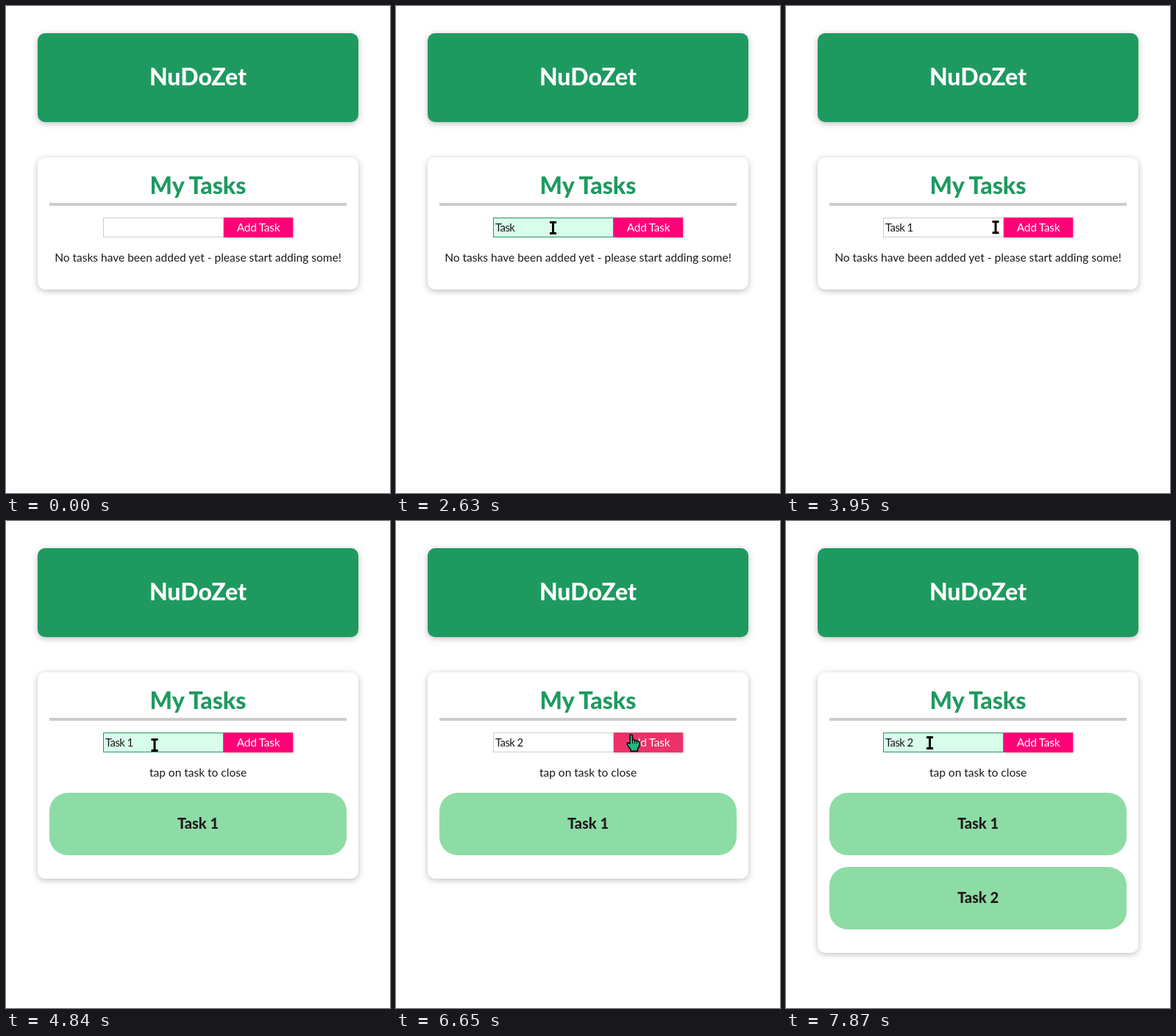
Write an HTML page that moves like this. It is 522x663 px and loops after 8 s.

```html
<!DOCTYPE html>
<html lang="en">
<head>
<meta charset="utf-8">
<title>Task list</title>
<style>
  html, body { margin: 0; width: 100%; height: 100%; overflow: hidden; background: #fff; }
  svg { display: block; width: 522px; height: 663px; font: 15.5px Lato, sans-serif; }
  text { white-space: pre; fill: #1a1a1a; }
  .mid { text-anchor: middle; }
  .panel { filter: drop-shadow(0 2px 4px rgba(0, 0, 0, .26)); }
  .title { font-size: 32px; font-weight: 800; }
  .field { font-size: 15px; letter-spacing: -.6px; }
  .label { letter-spacing: -.3px; fill: #fff; }
  .item rect { fill: #8ddca5; }
  .item text { font-size: 20px; font-weight: 800; fill: #20191d; }
  #button { fill: #ff0077; filter: drop-shadow(1px 1px 1.5px rgba(0, 0, 0, .26)); }
  #button.hover { fill: #ec3169; }
</style>
</head>
<body>
<svg viewBox="0 0 522 663">
  <rect class="panel" x="43" y="37" width="436" height="121" rx="10" fill="#1e9a60"/>
  <text class="title mid" x="261" y="108" style="fill:#fff">NuDoZet</text>

  <rect id="card" class="panel" x="43" y="206" width="436" height="180" rx="10" fill="#fff"/>
  <text class="title mid" x="261" y="256" style="fill:#1e9a60">My Tasks</text>
  <rect x="59" y="268" width="404" height="4" fill="#ccc"/>

  <rect id="button" x="296" y="288" width="94" height="27"/>
  <text class="label mid" x="343" y="307">Add Task</text>
  <rect id="input" x="132.5" y="288.5" width="163" height="26"/>
  <text id="value" class="field" x="135" y="307"></text>
  <rect id="caret" y="290" width="1" height="23"/>

  <text id="hint" class="mid" x="261" y="348"></text>
  <g class="item">
    <rect x="59" y="370" width="404" height="85" rx="25"/>
    <text class="mid" x="261" y="419">Task 1</text>
  </g>
  <g class="item" transform="translate(0 101)">
    <rect x="59" y="370" width="404" height="85" rx="25"/>
    <text class="mid" x="261" y="419">Task 2</text>
  </g>

  <g id="pointer">
    <circle id="press" r="12" fill="#f8a42c" fill-opacity=".85"/>
    <path id="arrow" d="M.5 .5V16L4 12.6L6.6 18.5L9 17.4L6.5 11.8H11.5Z" fill="#1fbf86" stroke="#000"/>
    <path id="beam" d="M-4.5 -9H4.5V-6H1.5V6H4.5V9H-4.5V6H-1.5V-6H-4.5Z"/>
    <g id="hand">
      <path d="M-1.5 13V2Q-1.5 .7 0 .7T2 2V8Q4 6.5 5 9Q7 7.5 8 10Q11 9 11.5 12V16L9 20V23.3H-.5V21L-5 15Q-6 12.5 -4 11.5Z"
        fill="#1fb985" stroke="#000" stroke-width="1.5" stroke-linejoin="round"/>
      <path d="M2 8V13M5 9V13M8 10V13" stroke="#000"/>
      <path id="grip" d="M-4 16H12V17L9 20V24H-1V21Z"/>
    </g>
  </g>
</svg>
<script>
const LOOP = 8000;
const STEP = 100;        // time between pointer positions, keys, press and release
const BLINK = 490;
const ADD_DELAY = 210;
const el = Object.fromEntries([...document.querySelectorAll('[id]')].map(n => [n.id, n]));
const items = document.querySelectorAll('.item');

// Where the pointer goes, how long it travels and when it clicks there.
const stops = [
  { x: 230, y: 433, arrive: 190, travel: 0 },
  { x: 213.5, y: 302, arrive: 490, travel: 200, click: 710 },
  { x: 314, y: 300, arrive: 3550, travel: 220, click: 3760 },
  { x: 202, y: 305, arrive: 4150, travel: 200, click: 4250 },
  { x: 407, y: 296, arrive: 6150, travel: 200 },
  { x: 319.5, y: 290, arrive: 6350, travel: 100, click: 6550 },
  { x: 195.5, y: 302, arrive: 7070, travel: 200, click: 7270 }
];
// '<' erases one character.
const bursts = [
  { at: 1520, keys: 'T' }, { at: 1930, keys: 'ask' }, { at: 2730, keys: ' ' },
  { at: 2930, keys: '1' }, { at: 5350, keys: '<2' }
];

const overButton = p => p.y >= 288 && p.y < 315 && p.x >= 296 && p.x < 390;
const overInput = p => p.y >= 288 && p.y < 315 && p.x >= 132 && p.x < 296;
const clicks = stops.filter(s => s.click);
const show = (node, on) => node.setAttribute('display', on ? 'inline' : 'none');
const ease = k => k * k * (3 - 2 * k);

function typedAt(t) {
  let text = '', last = 0;
  for (const { at, keys } of bursts) {
    [...keys].forEach((key, i) => {
      const time = at + i * STEP;
      if (t < time) return;
      text = key === '<' ? text.slice(0, -1) : text + key;
      last = time;
    });
  }
  return { text, last };
}

// The input gains focus on release and loses it as the button goes down.
function focusTime(t) {
  const starts = clicks.map(s => overInput(s) ? { on: true, time: s.click + STEP } : { on: false, time: s.click });
  const latest = starts.filter(s => t >= s.time).pop();
  return latest && latest.on ? latest.time : null;
}

function pointerAt(t) {
  const i = stops.findLastIndex(s => t >= s.arrive - s.travel);
  if (i < 1) return stops[i];
  const to = stops[i], from = stops[i - 1];
  const count = Math.round(to.travel / STEP) + 1;
  const done = Math.floor((t - to.arrive + to.travel) / STEP) + 1;
  const k = ease(Math.min(1, done / count));
  return { x: from.x + (to.x - from.x) * k, y: from.y + (to.y - from.y) * k };
}

function drawField(t) {
  const { text, last } = typedAt(t);
  const focus = focusTime(t);
  const focused = focus !== null;
  el.value.textContent = text;
  el.input.setAttribute('fill', focused ? '#d8fdeb' : '#fff');
  el.input.setAttribute('stroke', focused ? '#1e9a60' : '#ccc');
  show(el.caret, focused && t - Math.max(last, focus) < BLINK);
  el.caret.setAttribute('x', 135 + Math.round(text ? el.value.getComputedTextLength() : 0));
}

function drawTasks(t) {
  const count = clicks.filter(s => overButton(s) && t >= s.click + ADD_DELAY).length;
  items.forEach((item, i) => show(item, i < count));
  el.card.setAttribute('height', 180 + 101 * count);
  el.hint.textContent = count
    ? 'tap on task to close'
    : 'No tasks have been added yet - please start adding some!';
}

function drawPointer(t) {
  const p = pointerAt(t);
  show(el.pointer, p);
  el.button.classList.toggle('hover', !!p && overButton(p));
  if (!p) return;
  const pressed = clicks.some(s => t >= s.click && t < s.click + STEP);
  el.pointer.setAttribute('transform', `translate(${p.x} ${p.y})`);
  show(el.hand, overButton(p));
  show(el.beam, overInput(p));
  show(el.arrow, !overButton(p) && !overInput(p));
  show(el.press, pressed);
  show(el.grip, pressed);
}

const start = performance.now();
function tick() {
  const t = (performance.now() - start) % LOOP;
  drawField(t);
  drawTasks(t);
  drawPointer(t);
  requestAnimationFrame(tick);
}
tick();
</script>
</body>
</html>
```
